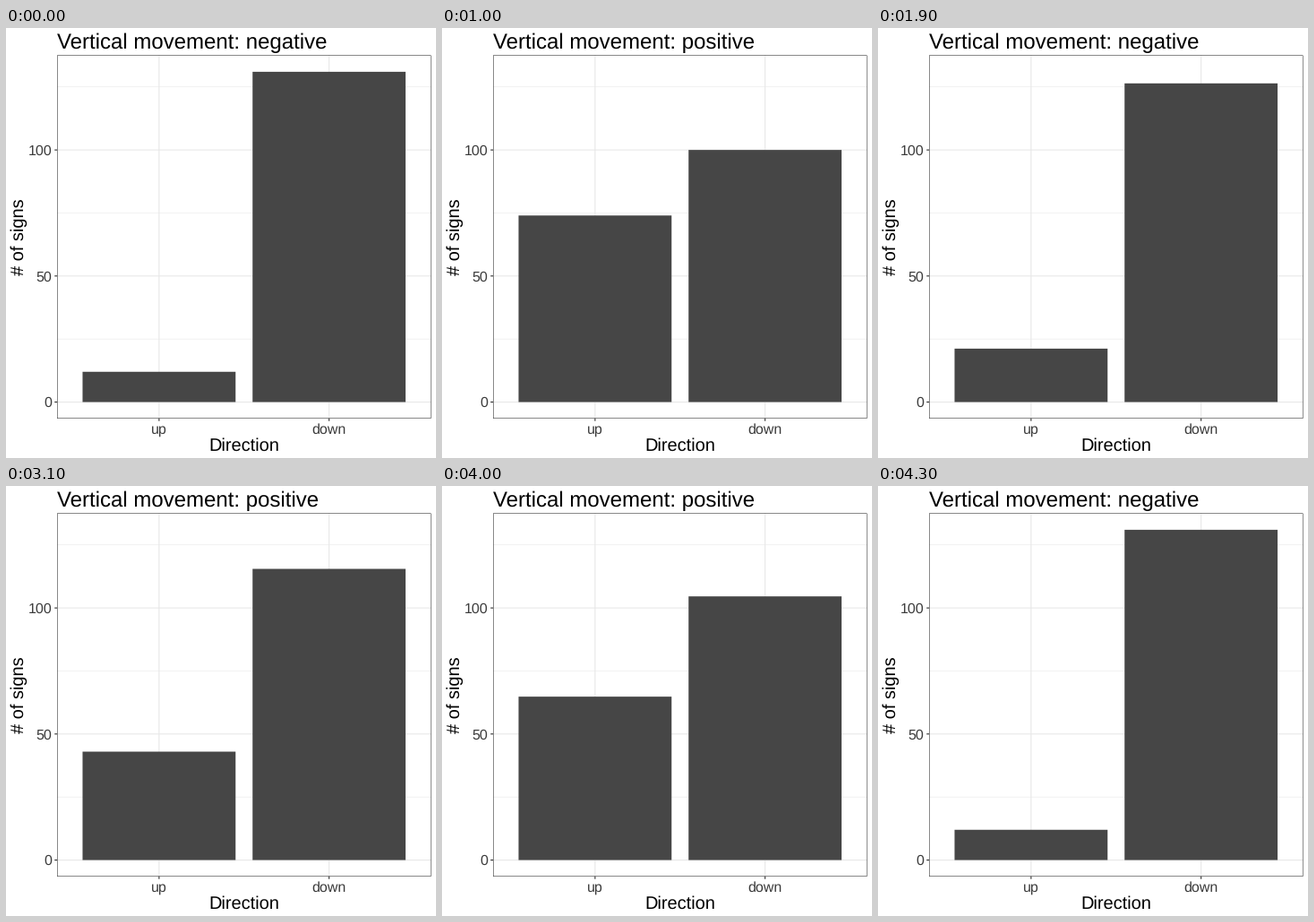
These frames come from a looping animation (480x480 px, 5000 ms). A matplotlib script:

```python
import matplotlib.pyplot as plt
from matplotlib.animation import FuncAnimation
from matplotlib.patches import Rectangle

plt.rcParams["font.family"] = "Liberation Sans"
plt.rcParams["text.hinting"] = "none"

SIZE, DPI = 480, 72  # at 72 dpi one point is one pixel
LEFT, RIGHT, TOP, BOTTOM = 57.0, 474.5, 30.45, 435.97
Y_MIN, Y_MAX = -6.55, 137.55
X_MIN, X_MAX = 0.4, 2.6
BAR, GRID, INK, LABEL = "#464646", "#e7e7e7", "#242424", "#3b3b3b"
LINE = 1.07
TICK = 2.75

NEGATIVE = (12, 131)
POSITIVE = (74, 100)

# (first frame, progress at the start, progress at the end), in sixths
MOVES = ((7, 2, 6), (17, 4, 2), (31, 3, 6), (40, 4, 0))
STEPS = (0, 2, 3, 4, 6)


def px(x):
    return LEFT + (x - X_MIN) / (X_MAX - X_MIN) * (RIGHT - LEFT)


def py(y):
    return BOTTOM - (y - Y_MIN) / (Y_MAX - Y_MIN) * (BOTTOM - TOP)


def cubic_in_out(t):
    return 4 * t**3 if t < 0.5 else 1 - 4 * (1 - t) ** 3


def progress(frame):
    """Eased share of the positive state at a frame."""
    step = 0
    for start, first, last in MOVES:
        if frame >= start:
            a, b = STEPS.index(first), STEPS.index(last)
            moved = min(frame - start, abs(b - a))
            step = STEPS[a + moved * (1 if b > a else -1)]
    return cubic_in_out(step / 6)


def title_at(frame):
    share = progress(frame)
    rising = share > progress(frame - 1)
    positive = share > 0.5 or (share == 0.5 and rising)
    return "Vertical movement: " + ("positive" if positive else "negative")


fig = plt.figure(figsize=(SIZE / DPI, SIZE / DPI), dpi=DPI, facecolor="white")
ax = fig.add_axes([0, 0, 1, 1])
ax.set_xlim(0, SIZE)
ax.set_ylim(SIZE, 0)
ax.axis("off")


def line(xs, ys, color, width=LINE, z=1):
    ax.plot(xs, ys, color=color, lw=width, zorder=z, snap=False,
            solid_capstyle="butt")


def text(x, y, label, size, color="black", ha="center", **kw):
    return ax.text(x, y, label, fontsize=size, color=color, ha=ha,
                   va="baseline", **kw)


for value in (25, 75, 125):
    line((LEFT, RIGHT), (py(value),) * 2, GRID, LINE / 2)

for value in (0, 50, 100):
    y = py(value)
    line((LEFT, RIGHT), (y, y), GRID)
    line((LEFT - TICK, LEFT), (y, y), INK)
    text(51.6, y + 5.8, str(value), 16, LABEL, "right")

bars = []
for x, name in ((1, "up"), (2, "down")):
    line((px(x),) * 2, (TOP, BOTTOM), GRID)
    line((px(x),) * 2, (BOTTOM, BOTTOM + TICK), INK)
    text(px(x), 453, name, 16, LABEL)
    bar = Rectangle((px(x - 0.45), py(0)), px(x + 0.45) - px(x - 0.45), 0,
                    fc=BAR, lw=0, zorder=2, snap=False)
    bars.append(ax.add_patch(bar))

# only the inner half of the border stroke is visible
inset = LINE / 4
ax.add_patch(Rectangle((LEFT + inset, TOP + inset),
                       RIGHT - LEFT - 2 * inset, BOTTOM - TOP - 2 * inset,
                       fill=False, ec=INK, lw=LINE / 2, zorder=3, snap=False,
                       joinstyle="miter"))

title = text(LEFT, 23, "", 24, ha="left")
text((LEFT + RIGHT) / 2, 472, "Direction", 20)
ax.text(20, (TOP + BOTTOM) / 2, "# of signs", fontsize=20, rotation=90,
        ha="right", va="center").set(
            ha="center", va="baseline", rotation_mode="anchor")


def update(frame):
    share = progress(frame)
    for bar, low, high in zip(bars, NEGATIVE, POSITIVE):
        bar.set_height(py(low + (high - low) * share) - py(0))
    title.set_text(title_at(frame))
    return [*bars, title]


anim = FuncAnimation(fig, update, frames=50, interval=100, repeat=True,
                     repeat_delay=0, init_func=lambda: update(0))
plt.show()
```
